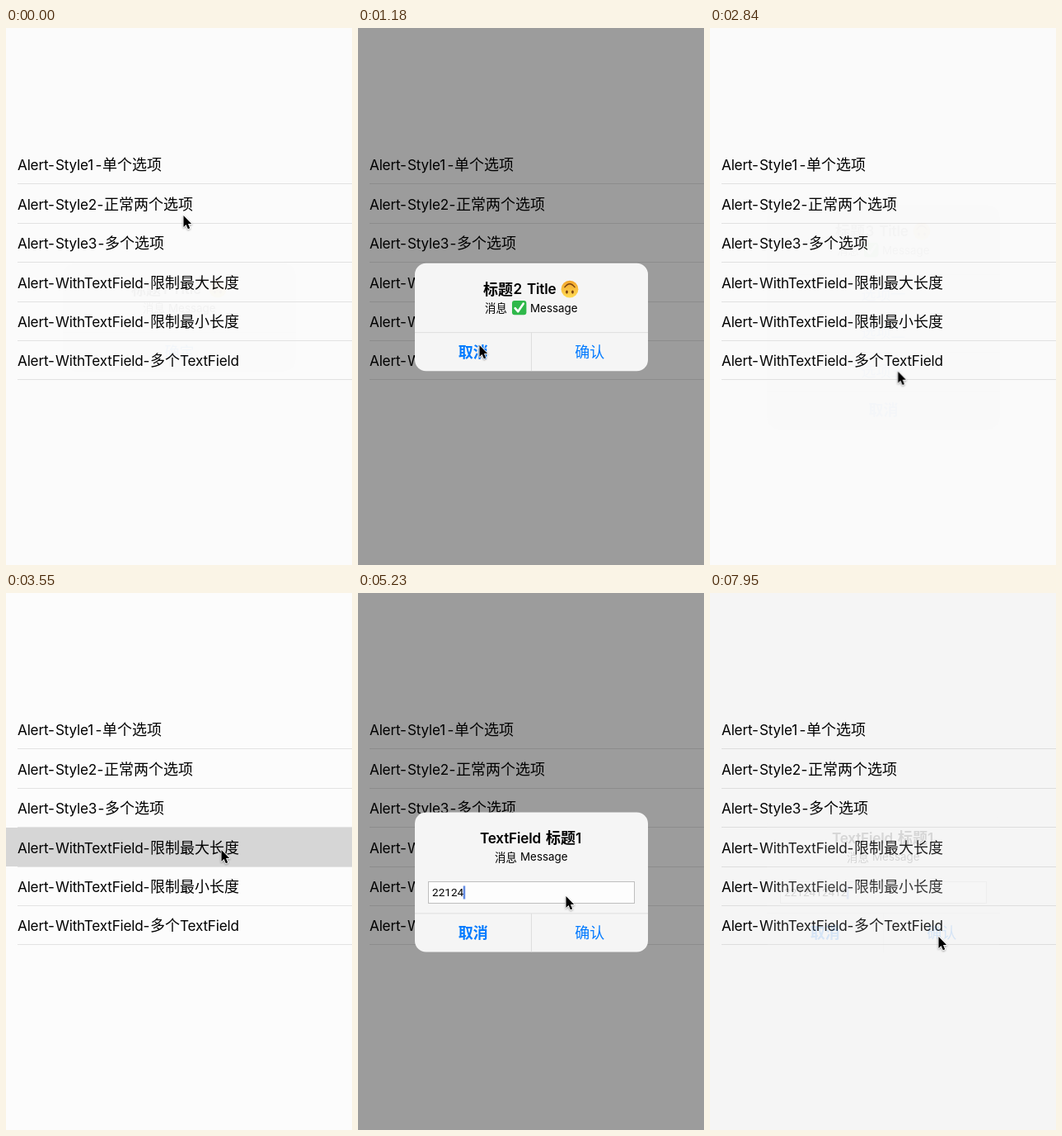
Write an HTML page that moves like this. It is 420 px wide and 650 px high and loops after 8 s.

```html
<!DOCTYPE html>
<html lang="zh-CN">
<head>
<meta charset="utf-8">
<title>Alert styles</title>
<style>
  html, body { margin: 0; width: 100%; height: 100%; overflow: hidden; background: #fcfcfc; }
  svg { display: block; width: 420px; height: 650px; }
  text { font-family: Inter, "Noto Sans CJK SC", "Noto Sans CJK", sans-serif; white-space: pre; }
  .latin { font-size: 17.2px; letter-spacing: -.22px; word-spacing: 1.8px; }
  .han { font-size: 18px; }
  .bold { font-weight: 600; }
  .small { font-size: 13.4px; }
  .btn { font-size: 18px; fill: #007aff; text-anchor: middle; }
  .digit { font: 13.6px Roboto, sans-serif; }
  .line { stroke: #e3e3e3; fill: none; }
  .rule { stroke: #dedede; fill: none; }
  .plate { fill: #f5f5f5; }
  .press { fill: #e2e2e2; opacity: 0; }
  .row { fill: #d6d6d6; opacity: 0; }
  .dim { fill: #000; fill-opacity: .385; }
  .dim, .plate, .content { opacity: 0; }
  .panel { transform-origin: 210.5px 350px; }
  #pointer { filter: drop-shadow(0 1px 1px rgba(0, 0, 0, .35)); }
</style>
</head>
<body>
<svg id="stage" viewBox="0 0 420 650">
  <defs>
    <linearGradient id="sun" x2="0" y2="1">
      <stop stop-color="#f3a52b"/><stop offset="1" stop-color="#ffdc55"/>
    </linearGradient>
    <g id="face">
      <circle r="10.4" fill="url(#sun)"/>
      <path d="M-6 -2.5Q0 -10.5 6 -2.5" fill="none" stroke="#7a4312" stroke-width="1.5" stroke-linecap="round"/>
      <ellipse cx="-3.5" cy="3.4" rx="1.4" ry="2.1" fill="#7a4312"/>
      <ellipse cx="3.5" cy="3.4" rx="1.4" ry="2.1" fill="#7a4312"/>
    </g>
    <g id="check">
      <rect x="-8.7" y="-8.7" width="17.4" height="17.4" rx="3" fill="#2fb84a"/>
      <path d="M-5 .5L-1.5 4.5L5 -5" fill="none" stroke="#fff" stroke-width="2.6" stroke-linecap="round" stroke-linejoin="round"/>
    </g>
  </defs>
</svg>
<script>
const LOOP = 8000;
const EASE = 'cubic-bezier(.1,.7,.3,1)';
const FAST = 'cubic-bezier(.05,.85,.25,1)';
const GLIDE = 'cubic-bezier(.4,0,.5,1)';
const LEFT = 69, WIDTH = 283, MID_X = 210.5, MID_Y = 350, ROW = 46.7, PITCH = 47.4;
const stage = document.getElementById('stage');

const text = (x, y, s, cls) => `<text x="${x}" y="${y}" class="${cls}">${s}</text>`;
const rect = (x, y, w, h, attrs) => `<rect x="${x}" y="${y}" width="${w}" height="${h}" ${attrs}/>`;
const hline = (x1, x2, y, cls) => `<path d="M${x1} ${y}H${x2}" class="${cls}"/>`;
const find = sel => stage.querySelector(sel);

// points: [ms, value, easing towards the next point]
function track(el, prop, points) {
  const frames = points.map(([t, v, easing = 'linear']) => ({ offset: t / LOOP, [prop]: v, easing }));
  const last = frames[frames.length - 1];
  frames.unshift({ ...frames[0], offset: 0, easing: 'linear' });
  frames.push({ ...last, offset: 1 });
  el.animate(frames, { duration: LOOP, iterations: Infinity });
}
const showAt = (el, t, end = LOOP) =>
  track(el, 'opacity', [[0, 0, 'step-end'], [t, 1, 'step-end'], [end, end < LOOP ? 0 : 1]]);

// List
const cells = [
  ['Style1', 117, '单个选项'],
  ['Style2', 119, '正常两个选项'],
  ['Style3', 120, '多个选项'],
  ['WithTextField', 175, '限制最大长度'],
  ['WithTextField', 175, '限制最小长度'],
  ['WithTextField', 175, '多个', 'TextField']
];
const list = cells.map(([word, x, han, tail], i) => {
  const y = 172.3 + PITCH * i, edge = Math.round(188.3 + PITCH * i);
  return rect(0, edge - 47, 420, 47, `class="row" id="row${i + 1}"`) +
    hline(14, 420, edge + .5, 'line') +
    text(14, y, 'Alert-', 'latin') + text(60, y, word, 'latin') +
    text(x - 8.5, y, '-', 'latin') + text(x, y, han, 'han') +
    (tail ? text(211, y, tail, 'latin') : '');
}).join('');

// Alerts
function iconHeader(n, withCheck) {
  return top => text(152, top + 38, '标题', 'han bold') +
    text(188.5, top + 37.6, n + ' Title', 'latin bold') +
    `<use href="#face" x="257" y="${top + 31.5}"/>` +
    text(withCheck ? 154 : 166, top + 59.2, '消息', 'small') +
    (withCheck ? `<use href="#check" x="195.7" y="${top + 54}"/>` : '') +
    text(withCheck ? 209 : 197, top + 59, 'Message', 'small');
}

function fieldHeader(top) {
  const digits = [...'2212412412'].map((d, i) => text(90 + 7.65 * i, 367.4, d, 'digit')).join('');
  return text(148, top + 37.6, 'TextField', 'latin bold') + text(228, top + 38, '标题', 'han bold') +
    text(264, top + 37.6, '1', 'latin bold') +
    text(166, top + 59.2, '消息', 'small') + text(197, top + 59, 'Message', 'small') +
    rect(85.5, 349.5, 250, 26, 'fill="#fdfdfd" stroke="#bebebe"') + digits +
    rect(89.7, 354.5, 2, 16, 'id="caret" fill="#3c6fdc"');
}

function alertBox({ id, head, header, buttons, pair, pressed }) {
  const rows = pair ? 1 : buttons.length;
  const height = head + ROW * rows, top = MID_Y - height / 2;
  const box = cls => rect(LEFT, top, WIDTH, height, `rx="13.6" ${cls}`);
  const w = pair ? WIDTH / 2 : WIDTH;
  const cellsOf = buttons.map((label, i) => {
    const x = LEFT + (pair ? w * i : 0), y = top + head + (pair ? 0 : ROW * i);
    const bold = label === '取消' ? ' bold' : '';
    return (i === pressed ? rect(x, y, w, ROW, 'class="press"') : '') +
      (pair && i ? `<path d="M${MID_X} ${y}v${ROW}" class="rule"/>` : hline(LEFT, LEFT + WIDTH, y, 'rule')) +
      text(x + w / 2, y + ROW / 2 + 6.7, label, 'btn' + bold);
  }).join('');
  return `<g id="${id}">${rect(0, 0, 420, 650, 'class="dim"')}
    <clipPath id="${id}Clip">${box('')}</clipPath>
    <g class="panel">${box('class="plate"')}
      <g class="content" clip-path="url(#${id}Clip)">${header(top)}${cellsOf}</g>
    </g></g>`;
}

const alerts = [
  { id: 'one', head: 84, header: iconHeader(1, false), buttons: ['确定'] },
  { id: 'two', head: 84, header: iconHeader(2, true), buttons: ['取消', '确认'], pair: true, pressed: 0,
    open: 300, press: 1240, close: 1320 },
  { id: 'three', head: 84, header: iconHeader(3, true), buttons: ['选项一', '选项二', '选项三', '取消'], pressed: 3,
    open: 1802, press: 2470, close: 2560 },
  { id: 'four', head: 122.5, header: fieldHeader, buttons: ['取消', '确认'], pair: true, pressed: 1,
    open: 3610, press: 7580, close: 7738, end: LOOP, rest: .06 }
];

const pointer = '<path id="pointer" d="M.5 1V14.9L3.6 12L5.9 17.2L8.2 16.2L6 11.1H10.2Z" ' +
  'fill="#000" stroke="#fff" stroke-width="1.6" stroke-linejoin="round" paint-order="stroke"/>';

stage.insertAdjacentHTML('beforeend', rect(0, 0, 420, 650, 'fill="#fcfcfc"') +
  list + alerts.map(alertBox).join('') + pointer);

// Motion
for (const { id, open, press, close, end = close + 400, rest = 0 } of alerts) {
  const part = cls => find(`#${id} .${cls}`);
  if (!open) {
    track(part('dim'), 'opacity', [[0, .008], [120, 0]]);
    track(part('plate'), 'opacity', [[0, .012], [120, 0]]);
    track(part('content'), 'opacity', [[0, .035], [120, 0]]);
    continue;
  }
  for (const cls of ['dim', 'plate', 'content']) {
    track(part(cls), 'opacity', [
      [open, 0, cls === 'plate' ? FAST : EASE], [open + 400, 1],
      [close, 1, EASE], [end, cls === 'dim' ? rest : rest * 2]
    ]);
  }
  track(part('panel'), 'transform', [[open, 'scale(1.2)', EASE], [open + 400, 'scale(1)']]);
  showAt(part('press'), press, close);
}

for (const [row, t] of [[2, 230], [3, 1740], [4, 3540]]) {
  track(find('#row' + row), 'opacity', [[0, 0, 'step-end'], [t, 1], [t + 250, 1], [t + 500, 0]]);
}

const typed = [4505, 4745, 4985, 5105, 5225, 5335, 5455, 5695, 5935, 6055];
stage.querySelectorAll('.digit').forEach((d, i) => showAt(d, typed[i]));
const caret = find('#caret');
track(caret, 'transform', [0, ...typed].map((t, i) => [t, `translate(${(7.65 * i).toFixed(2)}px, 0px)`, 'step-end']));
track(caret, 'opacity', [[6880, 1], [7000, 0], [7380, 0], [7500, 1]]);

const path = [
  [0, 215, 226], [380, 217, 228], [1060, 148, 384], [1180, 147, 383], [1320, 147, 384],
  [1720, 235, 262], [1790, 235, 268], [1890, 232.5, 297], [2380, 211, 466], [2580, 212, 464],
  [3300, 261, 310], [3620, 261, 310], [4390, 252, 366], [6650, 252, 366], [6760, 248, 366],
  [6880, 248, 366], [7480, 276.5, 415.5], [7800, 276.5, 415], [7940, 277, 415]
];
track(find('#pointer'), 'transform', path.map(([t, x, y]) => [t, `translate(${x}px, ${y}px)`, GLIDE]));
</script>
</body>
</html>
```
